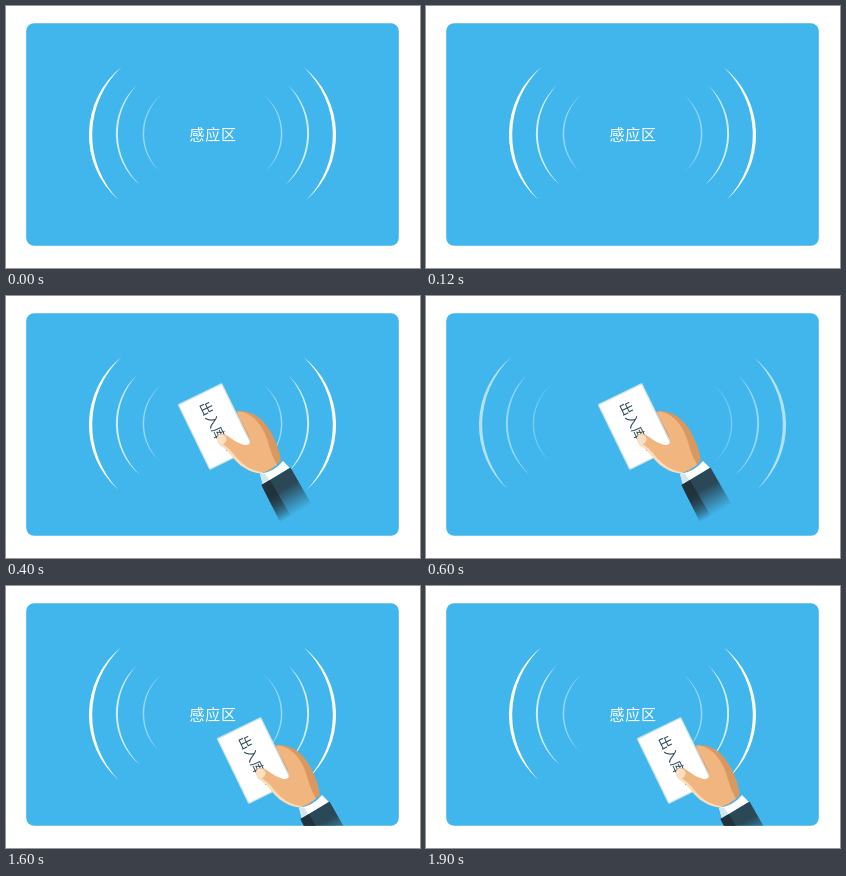
An HTML page that plays this animation: 414 px wide and 262 px high, repeating every 2.1 s.

```html
<!DOCTYPE html>
<html lang="zh-CN">
<head>
<meta charset="utf-8">
<style>
html, body { margin: 0; width: 100%; height: 100%; overflow: hidden; background: #fff; }
svg { display: block; width: 100%; height: 100%; }
text { font-family: "Noto Sans CJK SC", "Noto Sans CJK", sans-serif; }
</style>
</head>
<body>
<svg viewBox="0 0 414 262">
  <defs>
    <clipPath id="panel"><rect x="20.200" y="17.200" width="372.600" height="222.600" rx="8"/></clipPath>
    <linearGradient id="sleeve" gradientUnits="userSpaceOnUse" x1="270" y1="180" x2="291" y2="217">
      <stop offset=".35" stop-color="#2b4856"/>
      <stop offset="1" stop-color="#2b4856" stop-opacity="0"/>
    </linearGradient>
    <linearGradient id="sleeveShade" gradientUnits="userSpaceOnUse" x1="261" y1="185" x2="282" y2="222">
      <stop offset=".35" stop-color="#22323d"/>
      <stop offset="1" stop-color="#22323d" stop-opacity="0"/>
    </linearGradient>
    <!-- Tapered crescents, strongest on the outside -->
    <g id="waves" fill="#fff">
      <path d="M115.500 61A86.800 86.800 0 0 0 112.500 194A93.500 93.500 0 0 1 115.500 61Z"/>
      <path opacity=".75" d="M131 79A66.500 66.500 0 0 0 133.500 178.500A71 71 0 0 1 131 79Z"/>
      <path opacity=".45" d="M155 89A50 50 0 0 0 155 166.500A53 53 0 0 1 155 89Z"/>
    </g>
  </defs>
  <g clip-path="url(#panel)">
    <rect x="20" y="17" width="373" height="223" fill="#41b6ec"/>
    <use id="left" href="#waves"/>
    <use id="right" href="#waves"/>
    <text id="label" x="207.200" y="134" font-size="15" font-weight="500" letter-spacing=".8" text-anchor="middle" fill="#fff">感应区</text>
    <g id="hand">
      <path fill="#d9985f" d="M231 115C243 114 254 120 261 130C268 140 273 152 275 165L262 176L235 150Z"/>
      <g transform="translate(171.500 108.500) rotate(-26)">
        <rect width="49.500" height="73" rx="1.500" fill="#cfe3ec"/>
        <rect x="1.300" y="1.300" width="46.900" height="70.400" rx="1" fill="#fff"/>
      </g>
      <text transform="translate(193 108.500) rotate(64)" font-size="13.500" letter-spacing=".5" fill="#304a58">出入库…</text>
      <!-- Pale rim under the thumb and palm, then the skin -->
      <path fill="#fbdcbc" d="M258 178C247 177 238 173 232 167C225 160 221 153 214 149.500C210 146 210 140 214 138L245 160Z"/>
      <path fill="#f1b57f" d="M231 115.500C241 115 250 122 256 132C262 142 263 152 267 161L271 169L258 176.500C247 175 240 171 234 165C227 158 223 151 216 148C212 145 211 140 214 138C219 136 226 144 233 147C239 150 244 150 244 145C243 135 233 125 231 115.500Z"/>
      <path fill="#fbe0c6" d="M211.500 143C211 139 215 137 219 140C222 143 220 147 216 149C213 148 212 146 211.500 143Z"/>
      <path fill="#fff" d="M254 178Q268 176 277 165L284 172L257 188.500Z"/>
      <path fill="#d5e5ec" d="M254 178L259 177.500L264 185L257 188.500Z"/>
      <path fill="url(#sleeve)" d="M255.500 189L284.500 171.500L306.500 210L275.500 229Z"/>
      <path fill="url(#sleeveShade)" d="M255.500 189L264 184L286 222L275.500 229Z"/>
    </g>
  </g>
</svg>
<script>
const find = id => document.getElementById(id);
const left = find('left'), right = find('right'), label = find('label'), hand = find('hand');

function draw(now) {
  const t = now % 2100;
  const cardOnReader = t >= 400 && t < 1600;
  const responding = t >= 600 && t < 1600;
  const spread = responding ? 30 : 0;

  left.setAttribute('transform', `translate(${-spread} 0)`);
  right.setAttribute('transform', `translate(${413 + spread} 0) scale(-1 1)`);
  for (const side of [left, right]) side.setAttribute('opacity', responding ? 0.6 : 1);

  label.setAttribute('visibility', cardOnReader ? 'hidden' : 'visible');
  hand.setAttribute('visibility', t < 200 ? 'hidden' : 'visible');
  hand.setAttribute('transform', cardOnReader ? 'translate(0 0)' : 'translate(39 44)');
}

const start = performance.now();
function tick() {
  draw(performance.now() - start);
  requestAnimationFrame(tick);
}
tick();
</script>
</body>
</html>
```
